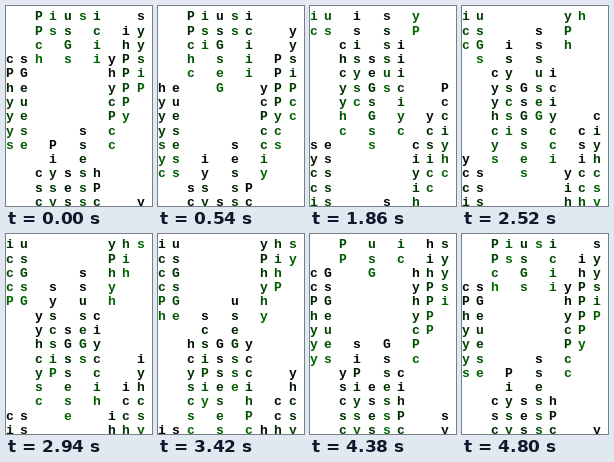
Recreate the animation shown at these times as an HTML page with a canvas. Size 146x200 px, loop 4860 ms.

```html
<!DOCTYPE html>
<html lang="en">
<head>
<meta charset="utf-8">
<title>Falling letters</title>
<style>
html, body { margin: 0; width: 100%; height: 100%; overflow: hidden; background: #fff; }
canvas { display: block; width: 146px; height: 200px; }
</style>
</head>
<body>
<canvas id="stage" width="146" height="200"></canvas>
<script>
const W = 146, H = 200, ROWS = 14, TRAIL = 6.95;
const STEP_MS = 60, STEPS = 81, FALL_STEPS = 80;
const HEAD_GREEN = 104;

// Each column: its fixed letters from top to bottom and the row its head starts on.
const columns = [
  ["icccPhyyysycci", 9.58],
  ["usGsGeuesessss", 9.9],
  ["PPchcyyhcyscsc", 3.05],
  ["isisyscsiPiysy", 1.15],
  ["usGseGsGsseses", 3.75],
  ["ssssuseGssesss", 0.35],
  ["iciiiciyccihPc", 3.15],
  ["yPhyhycPcciyih", 9.62],
  ["hihPPPPycsicch", 7.55],
  ["syysiPcciyhcsy", 5.7]
];

const ctx = document.getElementById("stage").getContext("2d");

function drawColumn(index, letters, head) {
  const x = Math.floor(index * W / columns.length);
  for (let row = 0; row < ROWS; row++) {
    const age = (head - row + ROWS) % ROWS;
    if (age >= TRAIL) continue;
    const green = Math.round(HEAD_GREEN * (1 - age / TRAIL));
    ctx.fillStyle = `rgb(0, ${green}, 0)`;
    ctx.fillText(letters[row], x, Math.round((row + 1) * H / ROWS));
  }
}

function draw(now) {
  const step = Math.floor(now / STEP_MS) % STEPS;
  const fallen = step * ROWS / FALL_STEPS;
  ctx.fillStyle = "#fff";
  ctx.fillRect(0, 0, W, H);
  ctx.font = 'bold 13px "Liberation Mono", monospace';
  ctx.textBaseline = "alphabetic";
  columns.forEach(([letters, start], i) => drawColumn(i, letters, (start + fallen) % ROWS));
}

let origin = null;
function tick(now) {
  if (origin === null) origin = now;
  draw(now - origin);
  requestAnimationFrame(tick);
}
draw(0);
requestAnimationFrame(tick);
</script>
</body>
</html>
```
